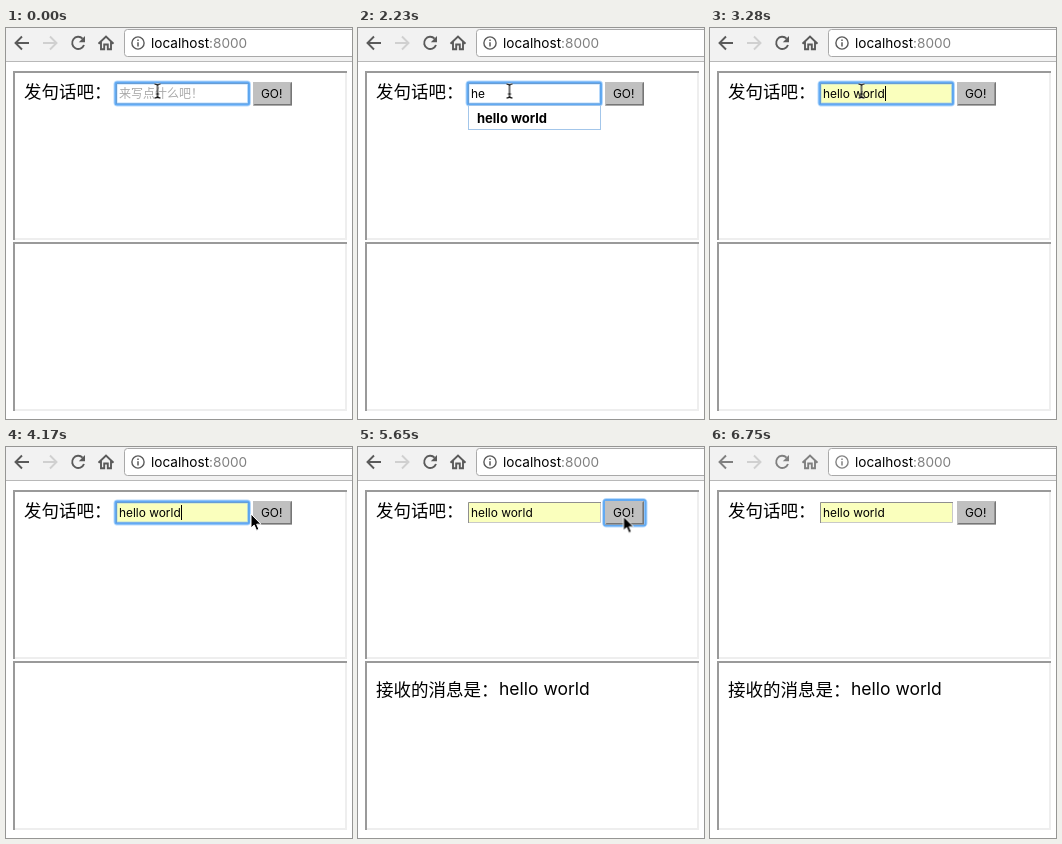
Animation, 346 px wide and 391 px high, one loop 6850 ms. Source, as an HTML page:

```html
<!DOCTYPE html>
<html lang="zh-CN">
<head>
<meta charset="utf-8">
<title>localhost:8000</title>
<style>
html, body { margin: 0; width: 100%; height: 100%; overflow: hidden; background: #fff; }
svg { display: block; width: 346px; height: 391px; }
text { font-family: Inter, Roboto, sans-serif; white-space: pre; }
.cjk { font-family: "Noto Sans CJK SC", "Noto Sans CJK", sans-serif; font-size: 17.5px; }
.latin { font-size: 17.5px; }
.url { font-size: 13.6px; }
.field { font-size: 11.9px; }
.hint { font-family: "Noto Sans CJK SC", "Noto Sans CJK", sans-serif; font-size: 12px; fill: #a9a9a9; }
.option { font-size: 13px; font-weight: 700; }
.icon { fill: none; stroke: #5a5a5a; stroke-width: 1.9; }
.line { fill: none; stroke-width: 2; }
.glow { fill: none; stroke: #62adf8; stroke-width: 4; opacity: .45; }
.halo { fill: none; stroke: #4d9ff2; stroke-width: 2; opacity: .8; }

/* every change is a hard cut in one shared loop */
.t { animation: 6850ms step-end infinite; }
#hint { animation-name: hint; }
#h { animation-name: h; }
#he { animation-name: he; }
#hello { animation-name: filled; }
#yellow { animation-name: filled; }
#menu { animation-name: menu; }
#pick { animation-name: pick; }
#focus { animation-name: focus; }
#goFocus { animation-name: go-focus; }
#caret { animation-name: caret; }
#reply { animation-name: reply; }
#beam { animation-name: beam; }
#arrow { animation-name: arrow; }
#icons { animation-name: icons; }

@keyframes hint { 0% { visibility: visible } 8.759%, 100% { visibility: hidden } }
@keyframes h { 0% { visibility: hidden } 8.759% { visibility: visible } 10.802%, 100% { visibility: hidden } }
@keyframes he { 0% { visibility: hidden } 10.802% { visibility: visible } 39.124%, 100% { visibility: hidden } }
@keyframes filled { 0% { visibility: hidden } 39.124%, 100% { visibility: visible } }
@keyframes menu { 0% { visibility: hidden } 8.759% { visibility: visible } 47.883%, 100% { visibility: hidden } }
@keyframes pick { 0% { visibility: hidden } 39.124% { visibility: visible } 47.883%, 100% { visibility: hidden } }
@keyframes focus { 0% { visibility: visible } 69.489%, 100% { visibility: hidden } }
@keyframes go-focus { 0% { visibility: hidden } 69.489% { visibility: visible } 98.54%, 100% { visibility: hidden } }
@keyframes reply { 0% { visibility: hidden } 71.532%, 100% { visibility: visible } }
@keyframes icons { 0% { opacity: 1 } 98.54%, 100% { opacity: .75 } }
@keyframes caret {
  0% { visibility: hidden; transform: translateX(113px) }
  6.569% { visibility: visible; transform: translateX(113px) }
  8.759% { visibility: visible; transform: translateX(120px) }
  10.802% { visibility: visible; transform: translateX(127px) }
  19.562% { visibility: hidden; transform: translateX(127px) }
  26.131% { visibility: visible; transform: translateX(127px) }
  32.554% { visibility: hidden; transform: translateX(127px) }
  47.883% { visibility: visible; transform: translateX(175px) }
  54.452% { visibility: hidden; transform: translateX(175px) }
  60.875% { visibility: visible; transform: translateX(175px) }
  69.489%, 100% { visibility: hidden; transform: translateX(175px) }
}
@keyframes beam {
  0% { visibility: visible; transform: translate(151.5px, 63px) }
  56.496% { visibility: visible; transform: translate(176.5px, 62px) }
  58.686% { visibility: visible; transform: translate(196.5px, 74px) }
  60.875%, 100% { visibility: hidden; transform: translate(196.5px, 74px) }
}
@keyframes arrow {
  0% { visibility: hidden; transform: translate(245px, 67px) }
  60.875% { visibility: visible; transform: translate(245px, 67px) }
  62.919% { visibility: visible; transform: translate(263px, 64px) }
  65.109% { visibility: visible; transform: translate(265.5px, 65.5px) }
  82.481% { visibility: visible; transform: translate(265.5px, 69.5px) }
  84.525% { visibility: visible; transform: translate(316px, 248.5px) }
  86.715% { visibility: visible; transform: translate(330px, 353.5px) }
  88.905% { visibility: visible; transform: translate(331.5px, 377px) }
  91.094% { visibility: visible; transform: translate(326px, 389.5px) }
  93.138%, 100% { visibility: hidden; transform: translate(326px, 389.5px) }
}
</style>
</head>
<body>
<svg viewBox="0 0 346 391">
  <defs>
    <g id="pane">
      <path class="line" stroke="#eee" d="M333 0V168H0"/>
      <path class="line" stroke="#9a9a9a" d="M1 169V1H334"/>
    </g>
  </defs>

  <!-- toolbar -->
  <rect width="346" height="33" fill="#f2f2f2"/>
  <rect y="33" width="346" height="1" fill="#b8b8b8"/>
  <rect x="118.5" y="1.5" width="240" height="27" rx="3" fill="#fff" stroke="#a9a9a9"/>
  <path class="icon" style="stroke:#d0d0d0" d="M37 15H50M44 8.5L50.5 15L44 21.5"/>
  <g id="icons" class="t">
    <path class="icon" d="M23 15H10M16 8.5L9.5 15L16 21.5"/>
    <path class="icon" d="M76.6 10.6A6.1 6.1 0 1 0 78 17"/>
    <path fill="#5a5a5a" d="M79 8V14.2H72.8Z"/>
    <path class="icon" stroke-width="1.7" d="M92.5 15.8L100 8.6L107.5 15.8M95 14V21.2H98.2V16.5H101.8V21.2H105V14"/>
    <circle class="icon" style="stroke-width:1.4" cx="132" cy="15" r="6.1"/>
    <path class="icon" style="stroke-width:1.5" d="M132 14.2V18.4M132 11.4V12.9"/>
  </g>
  <text class="url" x="145" y="20">localhost<tspan fill="#808080">:8000</tspan></text>

  <!-- panes -->
  <use href="#pane" x="7" y="43"/>
  <use href="#pane" x="7" y="214"/>

  <!-- form -->
  <text class="cjk" x="18" y="70.3">发句话吧：</text>
  <rect x="110" y="55" width="133" height="21" fill="#fff"/>
  <rect id="yellow" class="t" x="110" y="55" width="133" height="21" fill="#faffbd"/>
  <path fill="none" stroke="#c9c9c9" d="M242.5 55V75.5H110"/>
  <path fill="none" stroke="#8f8f8f" d="M110.5 76V55.5H243"/>
  <g id="focus" class="t">
    <rect class="glow" x="109.5" y="54.5" width="133.5" height="22" rx="2"/>
    <rect class="halo" x="109.5" y="54.5" width="133.5" height="22" rx="1.5"/>
  </g>
  <text id="hint" class="hint t" x="113" y="70">来写点什么吧！</text>
  <text id="h" class="field t" x="113" y="70">h</text>
  <text id="he" class="field t" x="113" y="70">he</text>
  <text id="hello" class="field t" x="113" y="70">hello world</text>
  <rect id="caret" class="t" y="58" width="1" height="15"/>

  <g id="goFocus" class="t">
    <rect class="glow" x="246" y="53" width="41.5" height="25.5" rx="2.5"/>
    <rect class="halo" x="246" y="53" width="41.5" height="25.5" rx="2"/>
  </g>
  <rect x="247" y="54" width="39" height="23.5" fill="#c0c0c0"/>
  <path fill="#767676" d="M286 54V77.5H247L248.6 75.9H284.4V55.6Z"/>
  <text class="field" x="255" y="70">GO!</text>

  <!-- suggestions -->
  <g id="menu" class="t">
    <rect x="110.5" y="77.5" width="132" height="24" fill="#fff" stroke="#a3c6ea"/>
    <rect id="pick" class="t" x="111" y="78" width="131" height="23" fill="#cdcdcd"/>
    <text class="option" x="119" y="95">hello world</text>
  </g>

  <!-- received message -->
  <g id="reply" class="t">
    <text class="cjk" x="18" y="248.8">接收的消息是：</text>
    <text class="latin" x="141" y="248.3">hello world</text>
  </g>

  <!-- pointers -->
  <g id="beam" class="t" fill="none">
    <path stroke="#fff" stroke-width="2.4" opacity=".6" d="M-3-7Q0-7 0-5Q0-7 3-7M0-5V5M-3 7Q0 7 0 5Q0 7 3 7"/>
    <path stroke="#000" stroke-width="1.1" d="M-3-7Q0-7 0-5Q0-7 3-7M0-5V5M-3 7Q0 7 0 5Q0 7 3 7M-1.5 3H1.5"/>
  </g>
  <path id="arrow" class="t" stroke="#fff" stroke-width="1" d="M0 0V14L3.2 11.1L5.5 16.4L7.9 15.3L5.7 10.2H10Z"/>
</svg>
</body>
</html>
```
